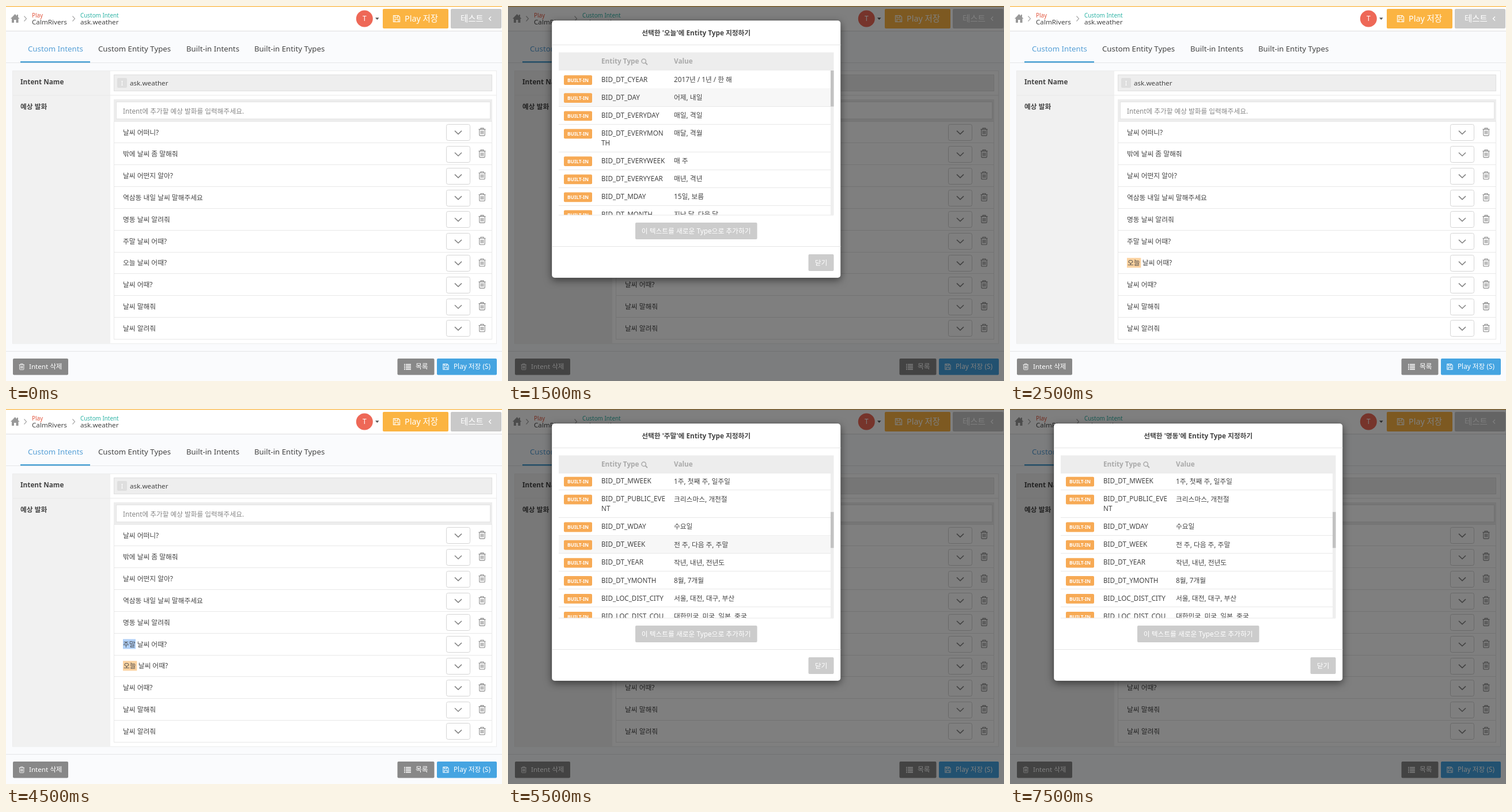
These frames come from a looping animation (861 by 651 pixels, 8 s). An HTML page:

```html
<!DOCTYPE html>
<html lang="ko">
<head>
<meta charset="utf-8">
<title>Intent editor</title>
<style>
html, body { margin: 0; width: 100%; height: 100%; overflow: hidden; background: #fafbfd; }
svg { display: block; width: 861px; height: 651px; }
text { font-family: "Noto Sans", "Noto Sans CJK KR", "Noto Sans CJK", sans-serif; }
#modal { filter: drop-shadow(0 4px 7px rgba(0, 0, 0, .5)); }
</style>
</head>
<body>
<svg id="stage" viewBox="0 0 861 651" xmlns="http://www.w3.org/2000/svg">
  <defs><clipPath id="listClip"><rect x="88" y="112" width="478" height="251"/></clipPath></defs>
  <g id="page"></g>
  <g id="dim">
    <rect width="861" height="651" fill="#000" opacity=".5"/>
    <g id="modal"></g>
  </g>
</svg>
<script>
const BASE = 11.75, INK = '#444', MUTED = '#aaa', BADGE = '#f7aa55';
const ROW = 37.82, ROW_TOP = 200.3, PANEL = 82;

const phrases = ['날씨 어떠니?', '밖에 날씨 좀 말해줘', '날씨 어떤지 알아?', '역삼동 내일 날씨 말해주세요',
  '명동 날씨 알려줘', '주말 날씨 어때?', '오늘 날씨 어때?', '날씨 어때?', '날씨 말해줘', '날씨 알려줘'];
const WEEKEND = 5, TODAY = 6;
const SELECT = '#b0d0f8', ORANGE = '#fcd2a0', BLUE = '#9fd7ed';

const types = [
  ['CYEAR', '2017년 / 1년 / 한 해'], ['DAY', '어제, 내일'], ['EVERYDAY', '매일, 격일'],
  ['EVERYMON|TH', '매달, 격월'], ['EVERYWEEK', '매 주'], ['EVERYYEAR', '매년, 격년'],
  ['MDAY', '15일, 보름'], ['MONTH', '지난 달, 다음 달'], ['MWEEK', '1주, 첫째 주, 일주일'],
  ['PUBLIC_EVE|NT', '크리스마스, 개천절'], ['WDAY', '수요일'], ['WEEK', '전 주, 다음 주, 주말'],
  ['YEAR', '작년, 내년, 전년도'], ['YMONTH', '8월, 7개월'],
  ['LOC_DIST_CITY', '서울, 대전, 대구, 부산'], ['LOC_DIST_COU|NTRY', '대한민국, 미국, 일본, 중국']
].map(([name, value]) => [(name.startsWith('LOC') ? 'BID_' : 'BID_DT_') + name, value]);

// Each step holds until the next one starts.
const steps = [
  { at: 0 },
  { at: 500, select: TODAY },
  { at: 1500, modal: '오늘', scroll: 0, hover: 1 },
  { at: 2500, tags: { [TODAY]: ORANGE } },
  { at: 3500, tags: { [TODAY]: ORANGE }, open: TODAY, entity: 'BID_DT_DAY', badgeX: 452.5 },
  { at: 4500, tags: { [TODAY]: ORANGE }, select: WEEKEND },
  { at: 5500, modal: '주말', scroll: 268, hover: 11 },
  { at: 6500, tags: { [WEEKEND]: BLUE, [TODAY]: ORANGE }, open: WEEKEND, entity: 'BID_DT_WEEK', badgeX: 461 },
  { at: 7500, modal: '명동', scroll: 268 }
];
const LOOP = 8000;

const rect = (x, y, w, h, fill, r = 0, stroke = 'none') =>
  `<rect x="${x}" y="${y}" width="${w}" height="${h}" rx="${r}" fill="${fill}" stroke="${stroke}"/>`;
const text = (x, y, s, fill = INK, size = BASE, weight = 400, anchor = 'start') =>
  `<text x="${x}" y="${y}" fill="${fill}" font-size="${size}" font-weight="${weight}" text-anchor="${anchor}">${s}</text>`;
const bold = (x, y, s, fill = INK, size = BASE, anchor) => text(x, y, s, fill, size, 700, anchor);
const path = (d, stroke, w = 1, fill = 'none') =>
  `<path d="${d}" stroke="${stroke}" stroke-width="${w}" fill="${fill}"/>`;
const hline = (x1, x2, y, color) => rect(x1, y, x2 - x1, 1, color);
const move = (x, y, s, k = 1) => `<g transform="translate(${x} ${y}) scale(${k})">${s}</g>`;

const trash = (x, y, color, k = 1) => move(x, y,
  path('M-6-4.5H6M-2.5-4.5V-6.5H2.5V-4.5M-4.7-4.5V5.2Q-4.7 6.5-3.4 6.5H3.4Q4.7 6.5 4.7 5.2V-4.5M-2-2V4M0-2V4M2-2V4', color, 1.1), k);
const disk = (x, y, k = 1) => move(x, y,
  path('M-5.5-5.5H3L5.5-3V5.5H-5.5ZM-3-5.5V-2H2V-5.5M-3 5.5V1H3V5.5', '#fff', 1.2), k);
const arrow = (x, y, up) => move(x, y, path(up ? 'M-6 3L0-2.7L6 3' : 'M-6-2.7L0 3L6-2.7', '#858585', 1.6));
const crumb = x => path(`M${x - 2} 17.5L${x + 2} 22L${x - 2} 26.5`, '#aaa', 1.2);

function header() {
  return rect(0, 0, 861, 43, '#fff') + rect(0, 0, 861, 1.3, '#fbb540') + hline(0, 861, 43, '#dedede') +
    path('M8 22L15.7 14L18.8 17.2V15H21V19.4L23.5 22H21.5V29H17.5V24H14V29H10V22Z', 'none', 0, '#999') +
    crumb(33.5) + text(45, 20, 'Play', '#e2573f', 9.9) + text(45, 31.7, 'CalmRivers', INK, 11.65) +
    crumb(117.5) + text(129, 20, 'Custom Intent', '#2db3a5', 9.9) + text(129, 31.7, 'ask.weather', INK, 11.65) +
    '<circle cx="622.3" cy="22" r="14.5" fill="#ee6857"/>' + text(622.3, 26.3, 'T', '#fff', 12, 400, 'middle') +
    path('M641 20.3H647.6L644.3 24Z', 'none', 0, '#555') +
    rect(654, 5, 114, 34, '#fbb442', 2) + disk(678, 22) + text(692, 27.3, 'Play 저장', '#fff', 14.4, 500) +
    rect(772, 5, 88, 34, '#c9c9c9', 2) + text(789, 27.3, '테스트', '#fff', 14.4, 500) +
    path('M842 18.5L838.5 22L842 25.5', '#fff', 1.2);
}

function tabs() {
  const names = [[38, 'Custom Intents'], [160, 'Custom Entity Types'], [313, 'Built-in Intents'], [431, 'Built-in Entity Types']];
  return hline(0, 861, 98, '#e4e5e7') + rect(25, 96, 121, 2.4, '#469fd3') +
    names.map(([x, s], i) => text(x, 79, s, i ? INK : '#559fd6', 13.25)).join('');
}

function phrase(i, y, step) {
  const s = phrases[i], tag = step.tags && step.tags[i];
  if (tag) {
    const [word, ...rest] = s.split(' ');
    return rect(203, y - 8.7, 24.3, 17, tag) +
      text(204, y + 4.4, `${word}<tspan dx="1"> ${rest.join(' ')}</tspan>`);
  }
  return (step.select === i ? rect(203, y - 8.7, 22, 17, SELECT) : '') + text(203, y + 4.4, s);
}

function panel(y, word, step) {
  return rect(188, y, 656, PANEL, '#f8f8f8') + rect(196.5, y + 8.5, 638, 64, '#fff', 0, '#ececec') +
    rect(196, y + 8, 639, 27, '#ededed') +
    bold(212, y + 26, 'Text', MUTED) + bold(380.5, y + 26, 'Entity Type', MUTED) +
    bold(548, y + 26, '문장 내 역할 (optional)', MUTED) +
    text(212, y + 58.3, word) + text(380.5, y + 58, step.entity) +
    rect(step.badgeX, y + 44.5, 32, 19, BADGE, 2) + bold(step.badgeX + 16, y + 58, '변경', '#fff', 10, 'middle') +
    rect(537.5, y + 39.5, 259, 25, '#fff', 0, '#ddd') + text(547, y + 57, step.entity) +
    path(`M813 ${y + 49.5}L821.5 ${y + 58}M821.5 ${y + 49.5}L813 ${y + 58}`, '#777', 3);
}

function footer(y) {
  const button = (x, w, fill) => rect(x, y + 13, w, 28.5, fill, 2);
  const label = (x, s, size) => text(x, y + 31.4, s, '#fff', size, 500);
  let bars = '';
  for (let i = 0; i < 4; i++) {
    const by = y + 22.5 + i * 2.8;
    bars += rect(691, by, 2, 1.6, '#fff') + rect(694, by, 9, 1.6, '#fff');
  }
  return hline(0, 861, y, '#e4e5e7') +
    button(12, 96, '#888') + trash(27.3, y + 27.3, '#fff', .78) + label(40, 'Intent 삭제', 11.6) +
    button(679.5, 64, '#888') + bars + label(711, '목록') +
    button(748, 104, '#45a4e1') + disk(763.5, y + 27.3, .85) + label(777, 'Play 저장 (S)');
}

function page(step) {
  const extra = step.open === undefined ? 0 : PANEL;
  let out = rect(0, 0, 861, 651, '#fafbfd') + header() + tabs() +
    rect(11.5, 112.5, 840, 473.5 + extra, '#fff', 0, '#ececec') +
    rect(12, 113, 169, 473 + extra, '#f1f1f1') + hline(12, 851, 154.5, '#e9e9e9') +
    bold(25, 136, 'Intent Name') + bold(25, 179.3, '예상 발화') +
    rect(187.5, 119.5, 656, 28, '#eee', 0, '#dfdfdf') + rect(193, 125, 17, 17, '#dedede', 2) +
    text(201.5, 137.5, 'I', '#fff', 10.5, 400, 'middle') + text(215, 138.3, 'ask.weather', INK, 11.65) +
    rect(187, 162, 657, 38.5, '#ededed') + rect(191.5, 166.5, 649, 29.5, '#fff', 0, '#e2e2e2') +
    text(203, 186.5, 'Intent에 추가할 예상 발화를 입력해주세요.', '#888', 11.7) +
    rect(187.5, 200.5, 656, 378 + extra, '#fff', 0, '#e8e8e8');
  phrases.forEach((_, i) => {
    const top = ROW_TOP + i * ROW + (i > step.open ? PANEL : 0), y = top + 18.8;
    const bottom = Math.round(top + ROW - .7);
    out += hline(188, 844, bottom, '#e8e8e8') + phrase(i, y, step) +
      rect(764.5, Math.round(y - 14) + .5, 41, 28, '#fff', 3, '#d4d4d4') +
      arrow(785, y + .3, step.open === i) + trash(826.5, y - .5, '#888');
    if (step.open === i) {
      out += panel(bottom + 1, phrases[i].split(' ')[0], step) + hline(188, 844, bottom + PANEL, '#e8e8e8');
    }
  });
  return out + footer(599 + extra);
}

function dialog(step) {
  let y = 112 - step.scroll, list = '';
  types.forEach(([name, value], i) => {
    const lines = name.split('|'), h = lines.length > 1 ? 47.8 : 31.1;
    if (step.hover === i) list += rect(88, y, 472, h, '#f7f7f7');
    list += hline(88, 560, Math.round(y + h - .5), '#e8e8e8') +
      rect(97, y + 8.2, 49, 16.8, BADGE, 2) + bold(121.5, y + 19.8, 'BUILT-IN', '#fff', 8.4, 'middle') +
      lines.map((s, n) => text(162, y + 19.8 + n * 16.8, s, INK, 11.7)).join('') +
      text(288, y + 20, value);
    y += h;
  });
  return rect(76, 25, 501.5, 447, '#fff', 5, 'rgba(0,0,0,.25)') +
    bold(326.7, 50.6, `선택한 '${step.modal}'에 Entity Type 지정하기`, INK, BASE, 'middle') +
    hline(76, 577.5, 67, '#e5e5e5') + rect(88, 80.5, 477.5, 31.5, '#ededed') +
    bold(162, 100.3, 'Entity Type', MUTED) + bold(288, 100.3, 'Value', MUTED) +
    '<circle cx="235.7" cy="95.7" r="3.7" fill="none" stroke="#aaa" stroke-width="1.5"/>' +
    path('M238.5 98.5L242 102', '#aaa', 1.8) +
    `<g clip-path="url(#listClip)">${list}</g>` + hline(88, 565, 362.5, '#e8e8e8') +
    rect(560, 112, 5.5, 251, '#eee') + rect(560, 112 + step.scroll * .249, 5.5, 62.5, '#c2c2c2') +
    rect(221, 376, 211.5, 29, '#ccc', 2) +
    text(326.7, 395, '이 텍스트를 새로운 Type으로 추가하기', '#fff', BASE, 500, 'middle') +
    hline(76, 577.5, 417, '#e5e5e5') + rect(521.5, 431, 44, 29, '#ccc', 2) +
    text(543.5, 450, '닫기', '#fff', BASE, 500, 'middle');
}

const el = id => document.getElementById(id);
let shown = null;

function draw(ms) {
  const step = steps.filter(s => s.at <= ms).pop();
  if (step === shown) return;
  shown = step;
  el('page').innerHTML = page(step);
  el('dim').style.display = step.modal ? '' : 'none';
  el('modal').innerHTML = step.modal ? dialog(step) : '';
}

const start = performance.now();
function tick() {
  draw((performance.now() - start) % LOOP);
  requestAnimationFrame(tick);
}
tick();
</script>
</body>
</html>
```
